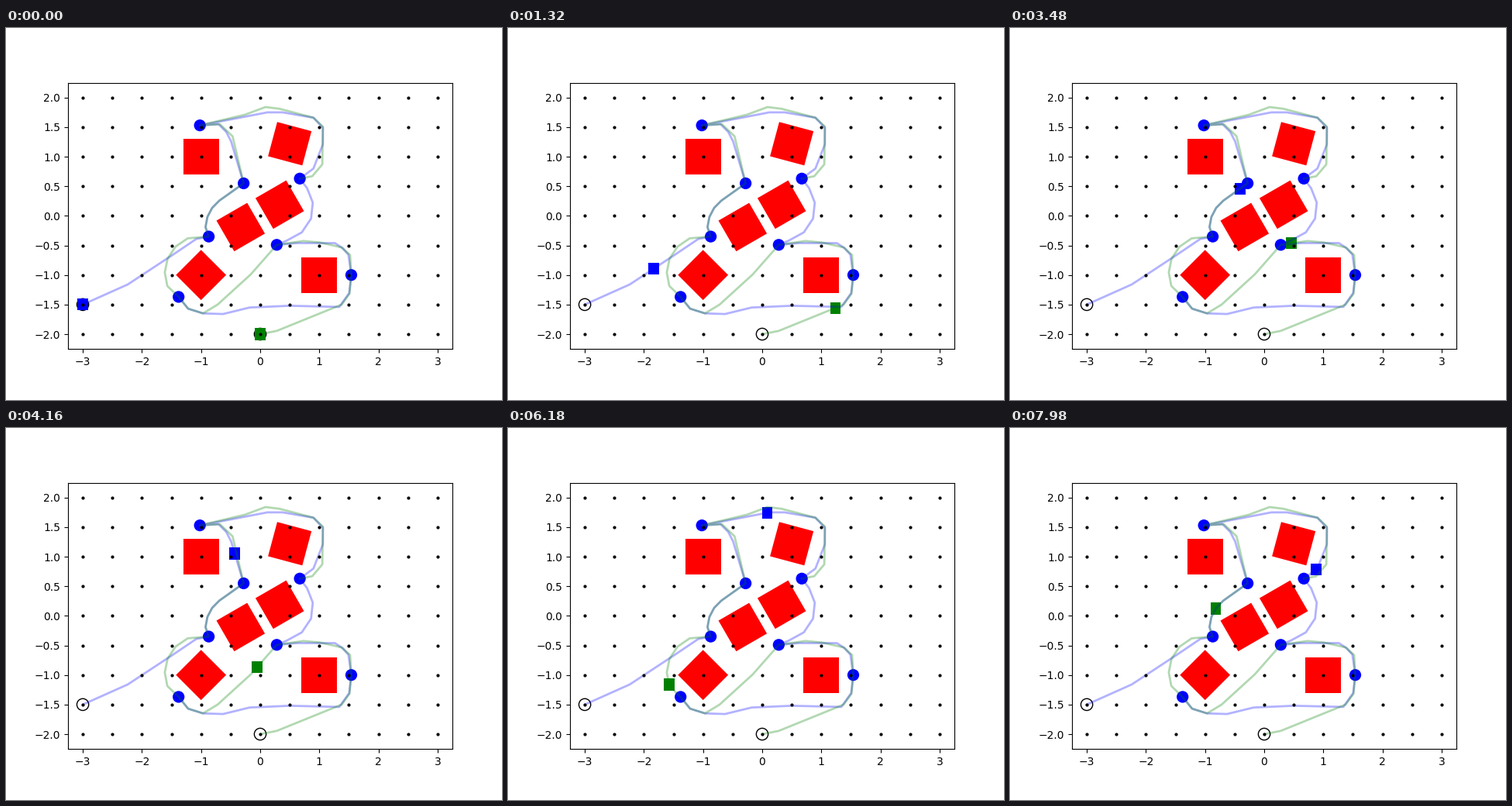
Write a matplotlib script that moves like this. It is 640 by 480 pixels and loops after 8000 ms.

```python
import numpy as np
import matplotlib.pyplot as plt
from matplotlib.animation import FuncAnimation
from matplotlib.patches import Circle, Rectangle

FRAMES = 400
STEP_MS = 20
SPEED = 1.0    # units per second
BOX_W, BOX_H = 0.18, 0.2
SIDE = 0.6

left, right, tilted = (-1, 1), (1, -1), (0.5, 1.22)
diamond, upper, lower = (-1, -1), (0.33, 0.19), (-0.33, -0.19)
obstacles = {left: 0, right: 0, diamond: 45, tilted: -15, upper: 30, lower: 30}

A, B, C, D = (-0.87, -0.35), (-0.28, 0.55), (-1.02, 1.53), (0.67, 0.63)
E, F, G = (0.28, -0.49), (1.54, -1), (-1.38, -1.37)


def hug(centre, a0, a1, r0, r1, n):
    """Corners of a bend around an obstacle, in degrees and radii."""
    a = np.radians(np.linspace(a0, a1, n))
    r = np.linspace(r0, r1, n)
    return list(zip(centre[0] + r * np.cos(a), centre[1] + r * np.sin(a)))


class Route:
    def __init__(self, points):
        self.xy = np.array(points)
        legs = np.hypot(*np.diff(self.xy, axis=0).T)
        self.dist = np.concatenate(([0], np.cumsum(legs)))

    def at(self, d):
        return [np.interp(d, self.dist, axis) for axis in self.xy.T]


a_to_b = [A, *hug(lower, 180, 129, 0.595, 0.575, 4), B]
under_diamond = hug(diamond, -87, -111, 0.65, 0.61, 2)

blue = Route([
    (-3, -1.5), (-2.24, -1.16), (-1.48, -0.66), (-1.08, -0.39),
    *a_to_b, *hug(left, 27, 62, 0.57, 0.625, 3),
    C, (0.12, 1.75), (0.38, 1.75), (0.9, 1.66), (1.06, 1.49), (1.06, 1.21),
    (0.9, 0.8), D, *hug(upper, 31, -79, 0.54, 0.62, 5),
    E, (0.62, -0.46), *hug(right, 64, 35, 0.6, 0.6, 3),
    F, *hug(right, -31, -58, 0.59, 0.637, 2),
    (0.5, -1.52), (-0.18, -1.55), (-0.63, -1.66), *under_diamond, G])
green = Route([
    (0, -2), (0.28, -1.945), *hug(right, -53, -32, 0.626, 0.6, 2),
    F, *hug(right, 33, 51, 0.62, 0.6, 2), (1.01, -0.45), (0.73, -0.425),
    E, (-0.16, -0.99), (-0.72, -1.5), *under_diamond,
    G, *hug(diamond, 198, 110, 0.6, 0.66, 5),
    *a_to_b, *hug(left, 33, 60, 0.635, 0.635, 2),
    C, (-0.26, 1.71), (0.09, 1.84), (0.33, 1.81), (0.9, 1.66), (1.06, 1.51),
    (1.05, 0.87), (0.88, 0.67), D])
routes = [(blue, "blue"), (green, "green")]

fig, ax = plt.subplots(figsize=(6.4, 4.8), dpi=100)
ax.set_aspect("equal")
ax.set_xlim(-3.25, 3.25)
ax.set_ylim(-2.25, 2.25)
ax.set_xticks(range(-3, 4))
ax.set_yticks(np.arange(-2, 2.1, 0.5))

for (x, y), angle in obstacles.items():
    ax.add_patch(Rectangle((x - SIDE / 2, y - SIDE / 2), SIDE, SIDE,
                           angle=angle, rotation_point="center",
                           facecolor="red"))
for stop in (A, B, C, D, E, F, G):
    ax.add_patch(Circle(stop, 0.1, facecolor="blue"))

boxes = []
for route, color in routes:
    ax.plot(*route.xy.T, color=color, alpha=0.3, linewidth=2)
    ax.add_patch(Circle(route.xy[0], 0.1, fill=False))
    boxes.append(ax.add_patch(Rectangle((0, 0), BOX_W, BOX_H,
                                        facecolor=color)))

gx, gy = np.meshgrid(np.arange(-3, 3.1, 0.5), np.arange(-2, 2.1, 0.5))
ax.plot(gx.ravel(), gy.ravel(), "k.", markersize=4)


def draw(i):
    d = SPEED * i * STEP_MS / 1000
    for (route, _), box in zip(routes, boxes):
        x, y = route.at(d)
        box.set_xy((x - BOX_W / 2, y - BOX_H / 2))
    return boxes


anim = FuncAnimation(fig, draw, frames=FRAMES, interval=STEP_MS,
                     repeat=True, repeat_delay=0, blit=False)
plt.show()
```
